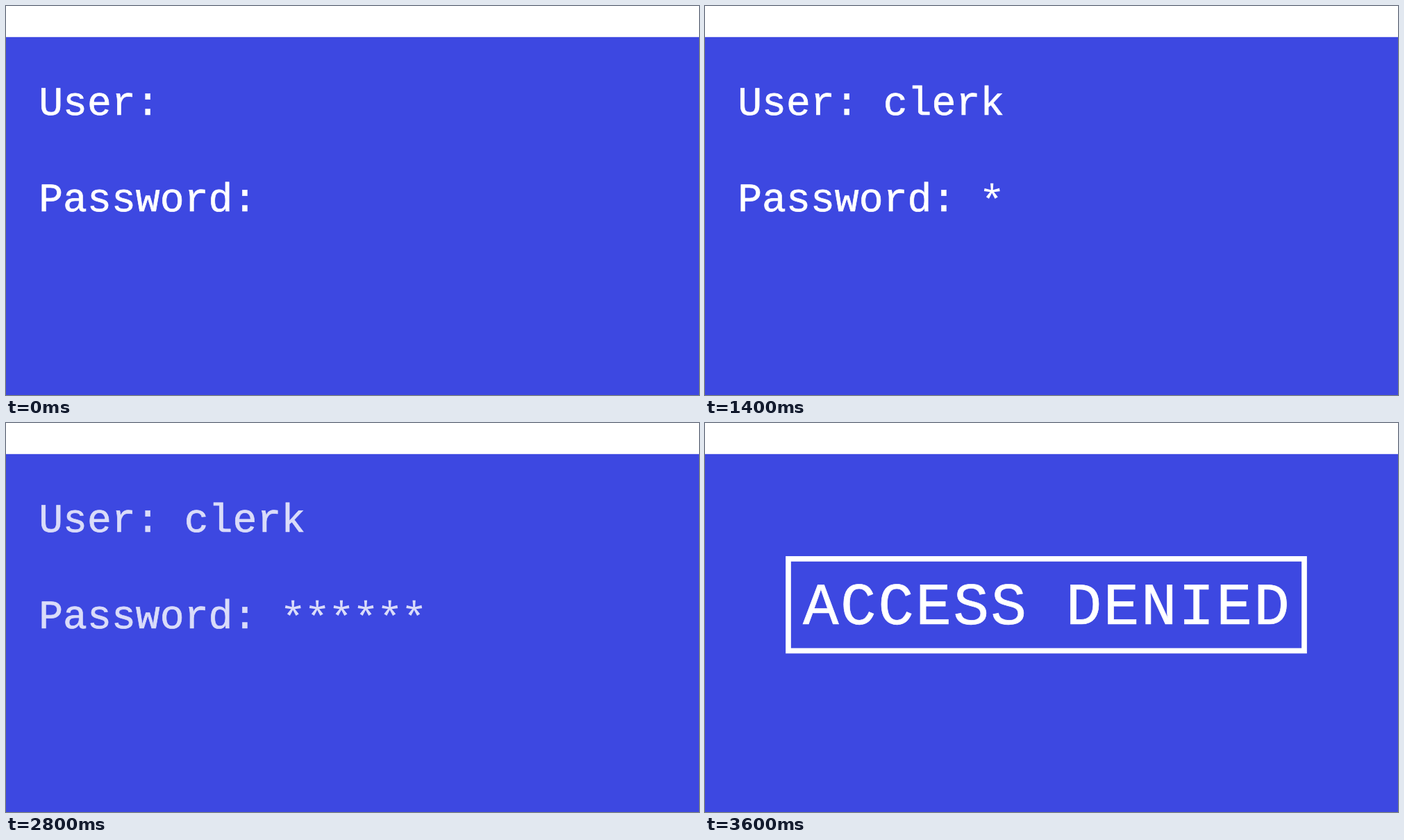
These frames come from a looping animation (998x561 px, 3.8 s). An HTML page:

```html
<!DOCTYPE html>
<html lang="en">
<head>
<meta charset="utf-8">
<title>Login</title>
<style>
  html, body { margin: 0; width: 100%; height: 100%; overflow: hidden; background: #fff; }
  svg { display: block; width: 998px; height: 561px; }
  text {
    font-family: "Liberation Mono", "Courier New", monospace;
    fill: #fff;
    stroke: #fff;
    stroke-width: 0.7px;
    white-space: pre;
    text-rendering: geometricPrecision;
  }
  #form text { font-size: 58.2px; }
  #form #stars {
    font-family: "Noto Sans Mono", monospace;
    font-size: 54px;
    letter-spacing: 2.5px;
    stroke: none;
  }
  #denied text { font-size: 86px; letter-spacing: 2.5px; }
</style>
</head>
<body>
<svg viewBox="0 0 998 561">
  <rect y="44.8" width="998" height="516.2" fill="#3d48e1"/>
  <g id="form">
    <text id="user" x="47.2" y="157">User:</text>
    <text x="47.2" y="296">Password:</text>
    <text id="stars" x="397" y="296"></text>
  </g>
  <g id="denied" visibility="hidden">
    <rect x="120" y="195.9" width="743" height="132.6" fill="none" stroke="#fff" stroke-width="7.7"/>
    <text x="141" y="289.5">ACCESS DENIED</text>
  </g>
</svg>
<script>
  const LOOP = 3800, STEP = 200;
  const NAME = "clerk", SECRET = "******";
  const NAME_AT = 200, SECRET_AT = 1400, FADE_AT = 2800, DENIED_AT = 3600;
  const FADE = [0.81, 0.6, 0.36, 0];

  const $ = id => document.getElementById(id);
  const form = $("form"), user = $("user"), stars = $("stars"), denied = $("denied");

  // Number of whole steps begun since `start`
  const steps = (t, start) => Math.max(0, Math.floor((t - start) / STEP) + 1);
  const typed = (value, t, start) => value.slice(0, steps(t, start));

  function put(el, str) {
    if (el.textContent !== str) el.textContent = str;
  }

  function draw(t) {
    put(user, "User: " + typed(NAME, t, NAME_AT));
    put(stars, typed(SECRET, t, SECRET_AT));
    const n = Math.min(steps(t, FADE_AT), FADE.length);
    form.setAttribute("opacity", n ? FADE[n - 1] : 1);
    denied.setAttribute("visibility", t >= DENIED_AT ? "visible" : "hidden");
  }

  const began = performance.now();
  function tick() {
    draw((performance.now() - began) % LOOP);
    requestAnimationFrame(tick);
  }
  tick();
</script>
</body>
</html>
```
